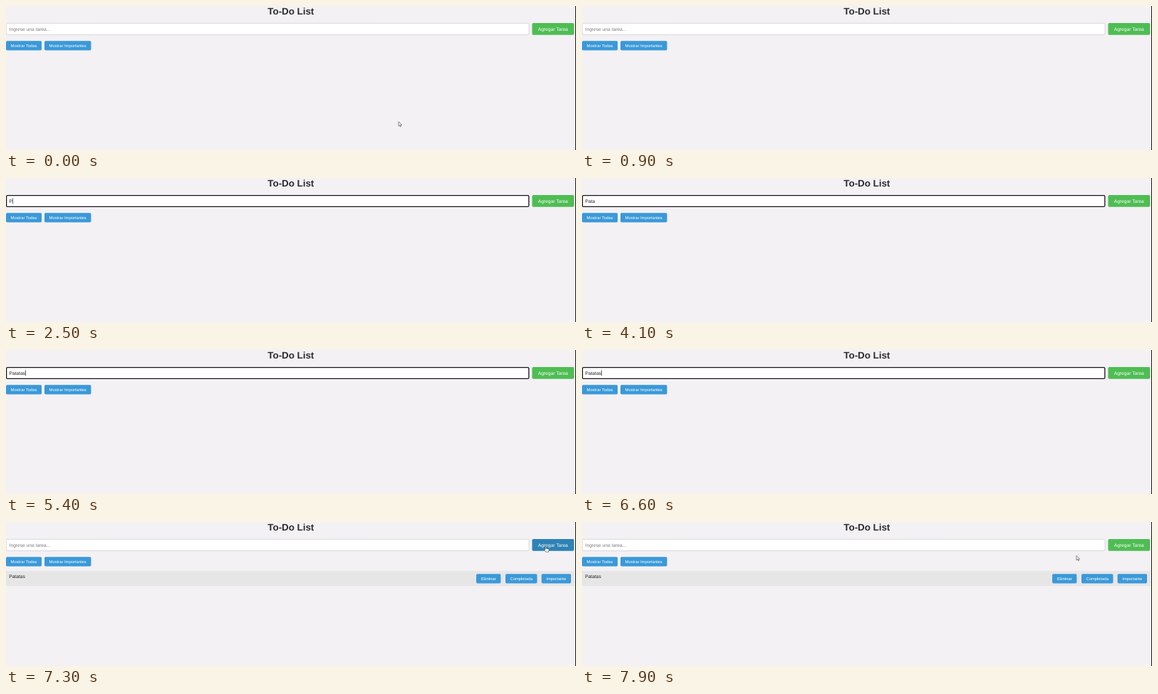
An HTML page for the animation above (8 s loop, 800 by 203 pixels).

```html
<!DOCTYPE html>
<html lang="es">
<head>
<meta charset="utf-8">
<title>To-Do List</title>
<style>
  html, body { margin: 0; width: 100%; height: 100%; overflow: hidden; background: #f3f1f4; }
  svg { display: block; width: 800px; height: 203px; }
  text { font-family: "Liberation Sans", Arial, sans-serif; font-size: 6.667px; text-rendering: geometricPrecision; }
  .small { font-size: 5.833px; }
  .title { font-size: 13.333px; font-weight: bold; fill: #2c2c2e; }
  .label { fill: #fff; text-anchor: middle; }
</style>
</head>
<body>
<svg viewBox="0 0 800 203">
  <rect width="800" height="203" fill="#f3f1f4"/>
  <text class="title" x="399.8" y="12" text-anchor="middle">To-Do List</text>
  <rect id="field" fill="#fff"/>
  <text id="value" x="4.6" y="34.7"></text>
  <rect id="caret" y="28.4" width=".7" height="8" fill="#222"/>
  <rect id="add" x="738.4" y="24" width="58.8" height="16.8" rx="1.7"/>
  <text class="label" x="767.8" y="34.7">Agregar Tarea</text>
  <g id="filters"></g>
  <g id="item">
    <rect y="69" width="798.5" height="21.3" fill="#e7e6e7"/>
    <text x="4.2" y="79" fill="#222">Patatas</text>
  </g>
  <rect x="799" width="1" height="203" fill="#18181a"/>
  <path id="arrow" d="M0 0V6.3L1.5 5L2.5 7.2L3.5 6.8L2.5 4.6H4.5Z" fill="#fff" stroke="#333" stroke-width=".6"/>
  <path id="hand" d="M0 .6Q.7-.4 1.4.6V3.3L4.4 3.9Q5.2 4.2 5 5.3L4.4 8.2H.9L-1.6 4.9Q-1.4 3.9 0 4.8Z" fill="#fff" stroke="#333" stroke-width=".6"/>
</svg>
<script>
const LOOP = 8000;
const GREEN = "#4fbd53", BLUE = "#3a99d8", HOVER = "#2e82b5";
const $ = id => document.getElementById(id);

function set(el, attrs) {
  for (const key in attrs) el.setAttribute(key, attrs[key]);
  return el;
}

function add(parent, tag, attrs) {
  const el = document.createElementNS("http://www.w3.org/2000/svg", tag);
  parent.append(el);
  return set(el, attrs);
}

function button(parent, label, x, y, width) {
  add(parent, "rect", { x, y, width, height: 13.2, rx: 1.6, fill: BLUE });
  add(parent, "text", { class: "label small", x: x + width / 2, y: y + 8.7 }).textContent = label;
}

button($("filters"), "Mostrar Todas", 0, 49.2, 50);
button($("filters"), "Mostrar Importantes", 54, 49.2, 65.4);
button($("item"), "Eliminar", 660, 73.2, 34.4);
button($("item"), "Completada", 701, 73.2, 44.4);
button($("item"), "Importante", 751.6, 73.2, 41.4);

const FOCUS = 1400, SUBMIT = 7300, ENTER = 7000, LEAVE = 7800;
const BLINK = 500;
// Each keystroke: time and number of letters entered so far.
const keys = [[FOCUS, 0], [2500, 1], [2800, 2], [3600, 4], [4200, 6], [5400, 7]];
// Pointer stops: time, x, y.
const pointerPath = [
  [100, 551, 163], [300, 500, 138], [500, 390, 84], [700, 330, 36],
  [6900, 726, 34], [7000, 741.5, 33.5], [7200, 757, 34],
  [7600, 757, 34], [7700, 744, 38], [7800, 714, 46], [7900, 694, 47.5]
];

function pointerAt(t) {
  const next = pointerPath.findIndex(p => p[0] > t);
  if (next === 0) return pointerPath[0].slice(1);
  if (next < 0) return pointerPath.at(-1).slice(1);
  const a = pointerPath[next - 1], b = pointerPath[next];
  const k = (t - a[0]) / (b[0] - a[0]);
  return [a[1] + (b[1] - a[1]) * k, a[2] + (b[2] - a[2]) * k];
}

function show(el, visible) {
  el.setAttribute("visibility", visible ? "visible" : "hidden");
}

function draw(time) {
  const t = Math.floor((time % LOOP) / 100) * 100;
  const focused = t >= FOCUS && t < SUBMIT;
  const key = keys.findLast(k => k[0] <= t) || [0, 0];
  const typed = focused ? "Patatas".slice(0, key[1]) : "";

  set($("field"), focused
    ? { x: .6, y: 24.6, width: 733.2, height: 15.8, rx: 1.5, stroke: "#17171a", "stroke-width": 1.3 }
    : { x: .3, y: 24.3, width: 733.8, height: 16.3, rx: 1.5, stroke: "#cbc9cc", "stroke-width": .7 });

  const value = $("value");
  value.textContent = typed || "Ingrese una tarea...";
  set(value, { fill: typed ? "#222" : "#7b7b7d" });
  const end = typed ? value.getComputedTextLength() : 0;
  set($("caret"), { x: 4.6 + end });
  show($("caret"), focused && Math.floor((t - key[0]) / BLINK) % 2 === 0);

  const hover = t >= ENTER && t < LEAVE;
  set($("add"), { fill: hover ? HOVER : GREEN });
  show($("item"), t >= SUBMIT);

  const [x, y] = pointerAt(t);
  const transform = `translate(${x} ${y})`;
  set($("arrow"), { transform });
  set($("hand"), { transform });
  show($("arrow"), t < 700 || t >= LEAVE);
  show($("hand"), hover);
}

const start = performance.now();
function tick() {
  draw(performance.now() - start);
  requestAnimationFrame(tick);
}
tick();
</script>
</body>
</html>
```
